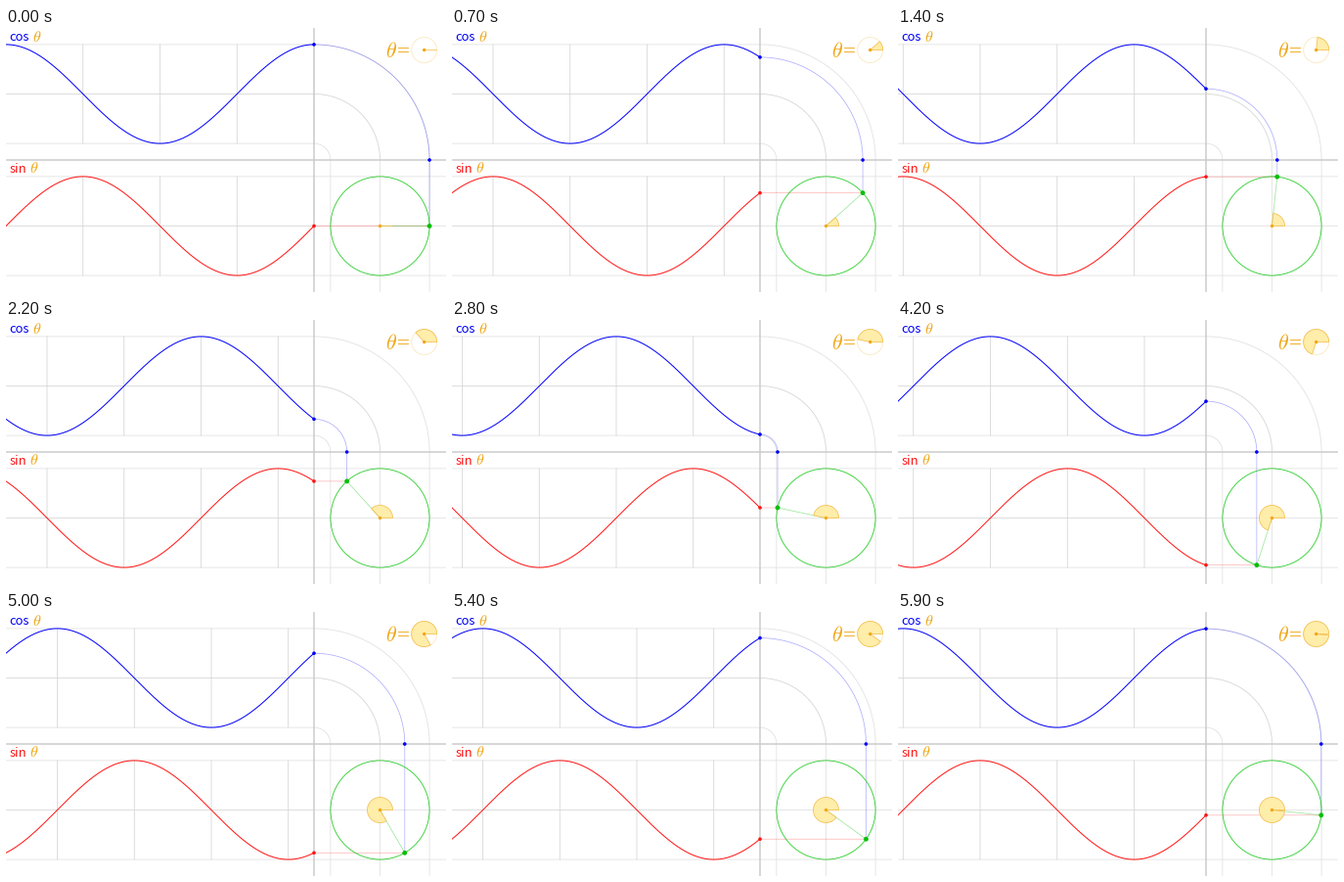
Recreate the animation shown at these times as a matplotlib script. Size 450x270 px, loop 6 s.

```python
import numpy as np
import matplotlib.pyplot as plt
from matplotlib.animation import FuncAnimation
from matplotlib.patches import Circle, Polygon

W, H, DPI = 450, 270, 72
FRAMES, INTERVAL = 60, 100

X0, Y0 = 315, 135        # crossing of the two axes
MID, R = 67.5, 50.6      # circle centre offset from the axes, and radius
CX, CY = X0 + MID, Y0 + MID
COS_Y = Y0 - MID
PERIOD = 315
PIE_R = 13
DIAL = (427.7, 22.5)
THIN = 0.75

BLUE, RED, GREEN = "#0000fa", "#ff1414", "#00c000"
GOLD, CREAM = "#efa818", "#ffedaa"
GRID, FAINT, AXIS = "#d2d2d2", "#dfdfdf", "#cccccc"

plt.rcParams["mathtext.fontset"] = "cm"
fig = plt.figure(figsize=(W / DPI, H / DPI), dpi=DPI, facecolor="white")
ax = fig.add_axes([0, 0, 1, 1])
ax.set_xlim(0, W)
ax.set_ylim(H, 0)
ax.axis("off")


def line(xs=(), ys=(), color=GRID, lw=THIN, z=1, **kw):
    return ax.plot(xs, ys, color=color, lw=lw, zorder=z, snap=False, **kw)[0]


def dot(color, radius, xy=(0, 0)):
    return ax.add_patch(Circle(xy, radius, fc=color, ec="none", zorder=8))


def ring(xy, radius, color, z):
    ax.add_patch(Circle(xy, radius, fc="none", ec=color, lw=THIN, zorder=z))


def pie(center):
    dot(GOLD, 1.7, center)
    return ax.add_patch(Polygon([center] * 3, closed=True, fc=CREAM,
                                ec="#f5bd48", lw=THIN, zorder=5, snap=False))


def label(x, y, text, color, size):
    ax.text(x, y, text, color=color, fontsize=size,
            family="Noto Sans CJK JP", va="baseline", zorder=9)


def quarter(radius):
    a = np.linspace(0, np.pi / 2, 60)
    return X0 + radius * np.sin(a), Y0 - radius * np.cos(a)


def sector(center, theta):
    a = np.linspace(0, theta, 60)
    rim = np.column_stack([center[0] + PIE_R * np.cos(a),
                           center[1] - PIE_R * np.sin(a)])
    return np.vstack([center, rim])


# Fixed guides
for k in (-1, 0, 1):
    color = FAINT if k else GRID
    radius = MID + k * R
    line([0, X0], [Y0 - radius] * 2, color)
    line(*quarter(radius), color)
    line([X0 + radius] * 2, [Y0, H], FAINT)
    line([0, X0], [Y0 + radius] * 2, color)
    line([X0, W], [Y0 + radius] * 2, FAINT)
line([0, W], [Y0, Y0], AXIS, 2 * THIN)
line([X0, X0], [0, H], AXIS, 2 * THIN)
ring((CX, CY), R, "#14c814", 6)
ring(DIAL, PIE_R, "#fbe6b8", 3)

# Labels
label(3.8, 12.7, "cos", BLUE, 13)
label(27, 13.5, r"$\theta$", GOLD, 16)
label(4, 147.7, "sin", RED, 13)
label(24, 148.5, r"$\theta$", GOLD, 16)
label(388.5, 30, r"$\theta$", GOLD, 22)
for y in (20.5, 24.5):
    line([401.5, 411.5], [y, y], GOLD, 0.9, 9)

# Moving parts
posts = [line() for _ in range(8)]
cos_wave = line(color=BLUE, lw=1, z=7)
sin_wave = line(color=RED, lw=1, z=7)
arc = line(color=BLUE, z=4, alpha=0.33)
drop = line(color=BLUE, z=4, alpha=0.3)
reach = line(color=RED, z=4, alpha=0.3)
spoke = line(color=GREEN, z=4, alpha=0.4)
main_pie, dial_pie = pie((CX, CY)), pie(DIAL)
cos_end, cos_foot = dot(BLUE, 1.8), dot(BLUE, 1.8)
sin_end, tip = dot(RED, 1.8), dot(GREEN, 2.4)
xs = np.linspace(0, X0, 316)


def update(i):
    theta = 2 * np.pi * i / FRAMES
    phase = theta - 2 * np.pi * (X0 - xs) / PERIOD
    cos_wave.set_data(xs, COS_Y - R * np.cos(phase))
    sin_wave.set_data(xs, CY - R * np.sin(phase))

    step = PERIOD / 4
    shift = PERIOD * i / FRAMES % step
    for k in range(4):
        x = X0 - shift - k * step
        for post, mid in zip(posts[2 * k:2 * k + 2], (COS_Y, CY)):
            post.set_data([x, x], [mid - R, mid + R])

    px, py = CX + R * np.cos(theta), CY - R * np.sin(theta)
    arc.set_data(*quarter(px - X0))
    drop.set_data([px, px], [Y0, py])
    reach.set_data([X0, px], [py, py])
    spoke.set_data([CX, px], [CY, py])
    cos_end.center = (X0, Y0 - (px - X0))
    cos_foot.center = (px, Y0)
    sin_end.center = (X0, py)
    tip.center = (px, py)
    main_pie.set_xy(sector((CX, CY), theta))
    dial_pie.set_xy(sector(DIAL, theta))
    return []


anim = FuncAnimation(fig, update, frames=FRAMES, interval=INTERVAL,
                     repeat=True, repeat_delay=0, init_func=lambda: update(0))
plt.show()
```
